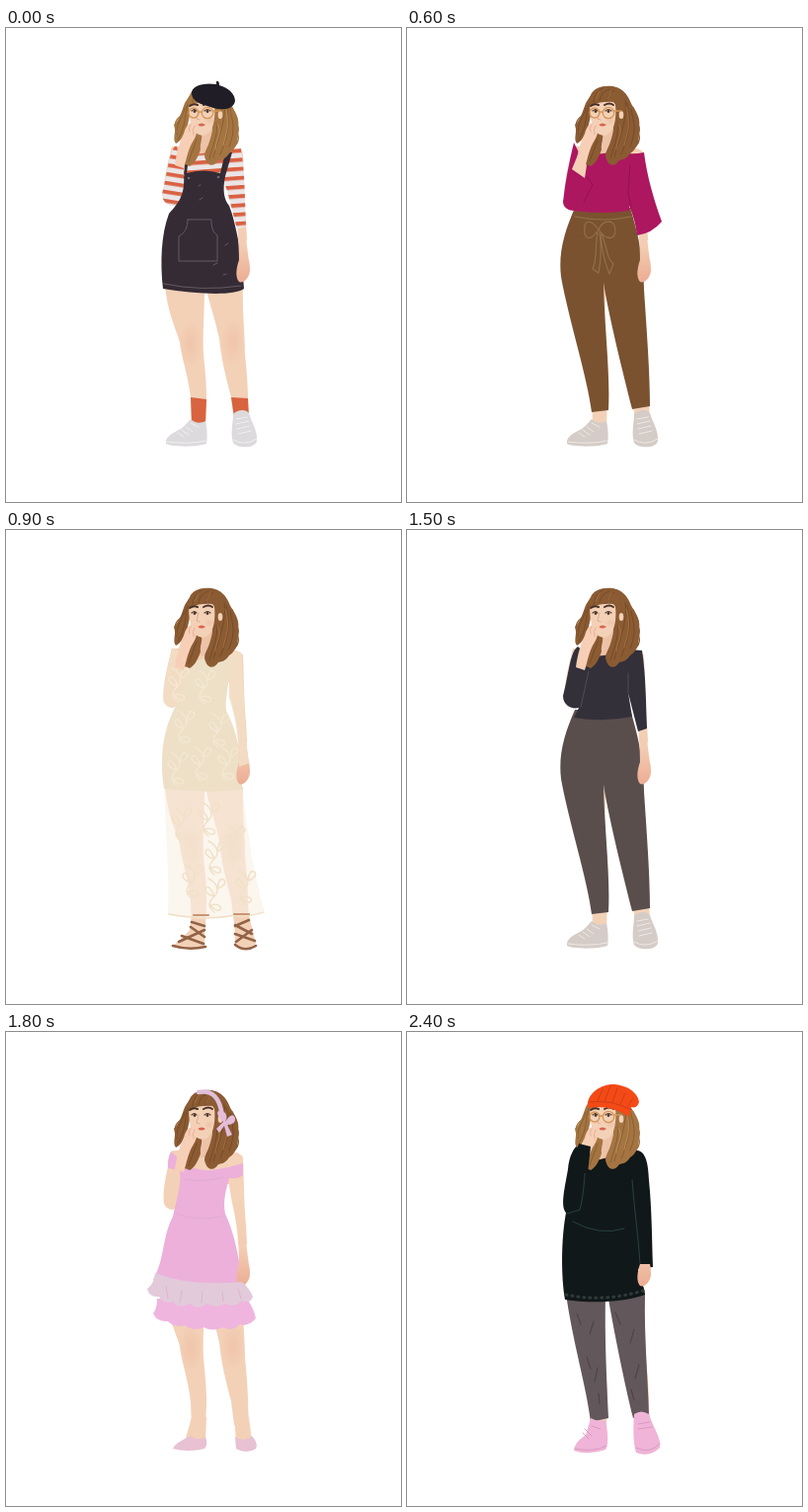
These frames come from a looping animation (400 by 480 pixels, 2.7 s). An HTML page:

```html
<!DOCTYPE html>
<html lang="en">
<head>
<meta charset="utf-8">
<title>Nine outfits</title>
<style>
html, body { margin: 0; width: 100%; height: 100%; overflow: hidden; background: #fff; }
svg { display: block; width: 100%; height: 100%; }
.look {
  visibility: hidden;
  animation: show 2700ms step-end infinite;
  animation-delay: calc(var(--i) * 300ms - 2700ms);
}
@keyframes show {
  0% { visibility: visible; }
  11.111111%, 100% { visibility: hidden; }
}
.light { --hair: #a47542; --dark: #805528; --shine: #c29a62; }
.brown { --hair: #8b5b33; --dark: #6d4423; --shine: #a97a4b; }
.hair { fill: var(--hair); }
.line { fill: none; stroke-linecap: round; stroke-linejoin: round; }
.skin { fill: #f3d1b7; }
</style>
</head>
<body>
<svg viewBox="0 0 400 480" xmlns="http://www.w3.org/2000/svg">
<defs>
  <radialGradient id="blush">
    <stop offset="0" stop-color="#e9a98e" stop-opacity=".32"/>
    <stop offset="1" stop-color="#e9a98e" stop-opacity="0"/>
  </radialGradient>
  <linearGradient id="armTone" gradientUnits="userSpaceOnUse" x1="0" y1="165" x2="0" y2="256">
    <stop offset="0" stop-color="#f4d3b8"/>
    <stop offset=".6" stop-color="#f3cdb3"/>
    <stop offset="1" stop-color="#ecae95"/>
  </linearGradient>
  <linearGradient id="denim" x1="0" y1="0" x2="0" y2="1">
    <stop offset="0" stop-color="#abd0df"/>
    <stop offset="1" stop-color="#9bc4d5"/>
  </linearGradient>
  <pattern id="stripeL" width="40" height="9" y="2" patternUnits="userSpaceOnUse" patternTransform="rotate(9 165 125)">
    <rect width="40" height="9" fill="#ebe5e6"/><rect width="40" height="3.8" fill="#da6143"/>
  </pattern>
  <pattern id="stripeR" width="40" height="9.2" y="3" patternUnits="userSpaceOnUse" patternTransform="rotate(-4 232 125)">
    <rect width="40" height="9.2" fill="#ebe5e6"/><rect width="40" height="4" fill="#da6143"/>
  </pattern>

  <g id="legs">
    <path class="skin" d="M161 260H201C201 290 199 310 200 330C202 350 203 362 203 376L202 402H188L187 374C184 350 178 335 176 318C170 300 163 285 161 260Z"/>
    <path class="skin" d="M202 260H240C239 285 242 310 242 330C244 350 245 365 245 376L246 398H231L228 374C223 355 218 335 216 315C212 295 206 280 202 260Z"/>
    <ellipse cx="187" cy="320" rx="13" ry="25" fill="url(#blush)"/>
    <ellipse cx="230" cy="318" rx="13" ry="25" fill="url(#blush)"/>
  </g>

  <g id="body">
    <path class="skin" d="M192 116H206C218 121 236 119 240 127L237 154H178L167 122C173 118 184 120 192 116Z"/>
    <path fill="url(#armTone)" d="M226 124L240 127C241 150 241 175 243 195L244 215H235C235 200 231 182 228 168C225 150 224 138 226 124Z"/>
    <path class="skin" d="M168 120C163 140 158 160 160 174C164 182 172 181 175 176C179 161 181 147 186 134L180 122Z"/>
  </g>
  <path id="palm" fill="url(#armTone)" d="M236 235H246C247 239 247 243 247 246C246 254 240 259 236 257C232 253 233 243 236 235Z"/>
  <g id="forearm">
    <path fill="url(#armTone)" d="M235 203H243C243 217 245 227 246 236L236 237C236 225 235 214 235 203Z"/>
    <use href="#palm"/>
  </g>

  <g id="head">
    <path fill="#edc3a8" d="M192 100L209 97L207 126L191 128Z"/>
    <path class="hair" d="M187 100L198 107C199 113 196 118 197 123C194 132 191 137 186 140Q183 138 179 138C184 125 188 113 187 100Z"/>
    <path class="hair" d="M186 68C190 57 211 56 219 64C226 70 226 77 230 81C231 86 236 91 235 98C238 104 233 110 235 116C232 120 230 125 226 127C222 133 219 133 215 134C211 141 204 140 202 133C199 127 204 122 206 115C209 107 209 101 209 96C212 85 209 78 207 75H188C187 82 186 90 184 98C182 106 178 114 172 117C168 112 173 105 170 98C176 92 178 84 181 76Z"/>
    <path class="skin" d="M186 73L210 71C213 85 211 99 207 104C203 110 197 111 190 104C186 94 184 84 186 73Z"/>
    <ellipse class="skin" cx="217" cy="88" rx="2.3" ry="4"/>
    <ellipse cx="206" cy="94" rx="6" ry="5" fill="url(#blush)"/>
    <path class="hair" d="M182 80C184 67 194 58 206 59C216 60 220 68 215 82L209 75C202 74 194 75 187 78Z"/>
    <g class="line" stroke="var(--dark)" stroke-width=".7">
      <path d="M184 77C180 87 184 96 174 113M181 81C179 91 172 96 173 108M189 75C190 68 193 64 198 61M195 74C196 68 199 64 205 62M202 74C204 69 205 66 210 63M213 96C215 106 211 115 206 132M221 73C224 90 216 108 210 131M223 76C225 88 229 99 217 128M227 82C228 92 234 101 226 120M193 113L185 135"/>
      <path d="M229 81Q238 94 233 104Q239 113 230 121M177 89Q168 95 173 106" stroke="var(--hair)" stroke-width="1.2"/>
      <path d="M214 97C220 106 213 110 212 123M222 80C228 99 222 108 220 119M191 72L195 64M203 72L207 64" stroke="var(--shine)"/>
    </g>
    <g class="line" stroke="#493025">
      <path d="M186 79Q190 76 194 78M200 78Q205 75 209 78" stroke-width="2"/>
      <path d="M188 84Q191 81 193 84M201 84Q204 81 207 84" stroke-width="1.1"/>
      <path d="M195 84L193 92L196 93" stroke="#dba085" stroke-width=".8"/>
    </g>
    <circle cx="191" cy="84.5" r="1.4" fill="#48362e"/><circle cx="204" cy="84.5" r="1.4" fill="#48362e"/>
    <path d="M194 98Q198 95 202 98Q198 101 194 98Z" fill="#d9654f"/>
  </g>
  <g id="glasses" class="line" stroke="#d59658" stroke-width="1.3">
    <circle cx="190" cy="86" r="5"/><circle cx="204" cy="86" r="5.7"/>
    <path d="M195 85H198M210 84L217 84"/>
  </g>
  <g id="hand">
    <path fill="#f6cfb6" d="M171 139C173 124 177 113 180 107C182 99 186 95 191 95C195 95 196 99 193 102C194 107 191 112 188 117C184 125 183 132 180 142Z"/>
    <path class="line" d="M187 98Q184 101 186 105M191 99Q188 103 190 108" stroke="#e5a68e" stroke-width=".8"/>
  </g>

  <g id="stripedShirt">
    <path fill="url(#stripeL)" d="M173 118C165 123 164 146 158 168C158 177 166 182 176 180L184 143L175 133Z"/>
    <path fill="url(#stripeR)" d="M180 125C190 121 205 121 226 122L238 122C242 146 242 178 243 201L234 204L224 165L218 150H180Z"/>
  </g>
  <path id="jeans" fill="url(#denim)" d="M156 246L240 244C239 290 244 340 245 388L226 390C216 350 205 300 199 262C202 310 207 350 207 393L188 391C183 340 165 300 156 246Z"/>
  <g id="sneakers">
    <path fill="var(--shoe)" d="M187 396C192 401 198 400 202 398C204 407 204 416 203 421C195 424 171 425 162 421C161 415 167 411 173 408C180 405 183 400 187 396Z"/>
    <path fill="var(--shoe)" d="M230 391C235 386 243 386 246 390C249 400 255 408 254 418C253 426 234 426 230 420C227 410 230 400 230 391Z"/>
    <g class="line" stroke="var(--lace)" stroke-width="1">
      <path d="M163 419Q184 422 203 418M230 417Q241 424 254 416M182 404L189 409M178 407L185 412M174 410L180 414M187 400L195 404M233 396L244 394M233 401L246 398M234 406L247 403M235 411L248 408"/>
    </g>
  </g>
  <path id="pants" d="M170 182H226C232 202 240 230 240 265C243 310 246 350 246 383L228 386C219 350 205 295 199 258C200 305 206 350 204 387L187 389C183 355 164 296 156 252C153 227 160 205 170 182Z"/>
  <g id="sweater">
    <path d="M174 113L186 116C183 122 183 128 184 134C195 126 215 127 225 120C240 117 244 126 245 150C248 180 248 210 249 238L234 240C234 249 241 257 241 266C220 274 185 275 160 271C156 247 156 210 161 183C155 176 160 157 163 139C164 126 169 117 174 113Z"/>
    <g class="line" stroke="#244341" stroke-width="1">
      <path d="M181 128C180 147 179 165 175 180L162 184M228 150C230 178 234 205 236 234M168 192Q195 207 220 199"/>
    </g>
  </g>
  <path id="vine" class="line" d="M0 0C10 5 11 13 6 18S-2 28 6 34M9 10C16 8 19 3 15 1S10 5 9 10M6 18C-1 17-5 11-2 9S4 13 6 18M2 27C9 25 14 28 12 31S5 31 2 27"/>
</defs>

<!-- Pinafore and beret -->
<g class="look light" style="--i:0;--shoe:#dcdadd;--lace:#f1eff2">
  <use href="#legs"/>
  <path fill="#d8633f" d="M187 374L203 376L202 400H188ZM228 374L245 375L246 394H231Z"/>
  <use href="#sneakers"/><use href="#body"/><use href="#stripedShirt"/>
  <path fill="#352b35" d="M183 147Q200 142 217 147L222 126H229L222 150C219 165 221 174 226 180C234 200 240 240 241 264C230 272 190 269 159 264C156 238 157 209 165 188C172 180 178 174 180 160L181 132H185Z"/>
  <path class="line" d="M184 194H208C208 205 211 208 214 210V236H175V211C181 208 184 202 184 194ZM160 259Q198 267 238 261" stroke="#665963" stroke-width="1"/>
  <path class="line" d="M196 174L199 172M222 220L225 218M210 240L214 238M220 250L223 249M195 160L197 159" stroke="#665963" stroke-width="1"/>
  <circle cx="185" cy="152" r="1.3" fill="#716677"/><circle cx="215" cy="151" r="1.3" fill="#716677"/>
  <use href="#forearm"/>
  <use href="#head"/><use href="#glasses"/><use href="#hand"/>
  <path fill="#211d26" d="M188 67C187 59 199 55 213 57L213 54Q216 53 216 58C226 61 232 67 232 74C230 83 219 84 207 80C196 77 189 74 188 67Z"/>
</g>

<!-- Shirt and jeans -->
<g class="look brown" style="--i:1;--shoe:#d8d0cc;--lace:#f0e9e5">
  <use href="#legs"/><use href="#sneakers"/><use href="#body"/>
  <use href="#pants" fill="url(#denim)"/><use href="#forearm"/>
  <path fill="#dedde3" d="M173 118C165 123 164 146 158 168C158 177 166 182 174 180L169 190Q200 195 228 189L224 165L234 204L243 201C242 178 242 146 238 122L226 121L180 124Z"/>
  <path class="line" d="M184 143L176 179M224 145V165" stroke="#c2c1ca"/>
  <use href="#head"/><use href="#glasses"/><use href="#hand"/>
</g>

<!-- Berry blouse -->
<g class="look brown" style="--i:2;--shoe:#d5ccc7;--lace:#eee8e4">
  <use href="#legs"/><use href="#sneakers"/><use href="#body"/>
  <use href="#pants" fill="#7a5230"/>
  <g class="line" stroke="#93704c" stroke-width="1.1">
    <path d="M170 191Q198 197 227 191M193 203C185 192 178 195 180 208C183 218 190 210 194 204C199 193 210 194 211 204C211 215 202 216 194 204M193 207C190 224 193 233 188 244L194 248C197 232 197 220 195 207M197 208C203 223 202 233 209 239L205 249C199 235 197 222 196 209"/>
  </g>
  <use href="#forearm"/>
  <path fill="#ad1760" d="M169 116C164 137 160 157 158 176C158 182 164 185 169 185Q198 189 225 185L225 180Q231 194 233 210Q248 208 258 196C250 174 243 150 240 126Q226 129 211 125L190 125L186 139L176 130Z"/>
  <path class="line" d="M182 150L188 159L179 176M226 139L224 166L227 183" stroke="#93104f" stroke-width="1"/>
  <path class="skin" d="M174 126L183 132L180 152L167 143Z"/>
  <use href="#head"/><use href="#glasses"/><use href="#hand"/>
</g>

<!-- Lace gown -->
<g class="look brown" style="--i:3">
  <use href="#legs"/>
  <path class="skin" d="M188 390H202L201 421Q184 426 169 421Q180 412 186 405ZM231 390H246L253 419Q242 427 232 420Z"/>
  <g class="line" stroke="#936346" stroke-width="2.6">
    <path d="M169 421Q185 426 202 422M178 411L200 419M175 417L201 405M187 402L201 412M188 397L201 401M232 420Q242 428 253 421M232 409L252 416M233 417L249 405M232 400L249 409M232 401L246 395"/>
  </g>
  <use href="#body"/>
  <path fill="#f8f0e3" fill-opacity=".6" d="M160 255L239 256C244 305 251 350 262 388Q247 393 231 391Q205 397 164 390C166 350 161 300 160 255Z"/>
  <path fill="#ede0c7" d="M178 137C188 130 205 132 227 125C229 148 221 167 223 183C235 205 240 235 239 263Q200 267 160 262C155 228 160 203 169 184C177 170 179 154 178 137Z"/>
  <use href="#forearm"/>
  <path fill="#f3dec6" fill-opacity=".9" d="M168 119C164 139 157 163 160 175Q168 183 175 177L186 137L177 123ZM226 121L238 124C242 160 241 205 246 236L236 240C237 210 231 185 226 170Z"/>
  <g stroke="#f3e8d4" stroke-width="1.3">
    <use href="#vine" x="195" y="142"/><use href="#vine" x="174" y="183"/>
    <use href="#vine" x="209" y="186"/><use href="#vine" x="191" y="220"/>
    <use href="#vine" x="218" y="220"/><use href="#vine" x="167" y="225"/>
    <use href="#vine" x="168" y="140"/>
  </g>
  <g stroke="#f0e1c8" stroke-width="1.5">
    <use href="#vine" x="199" y="276"/><use href="#vine" x="171" y="281"/>
    <use href="#vine" x="205" y="315"/><use href="#vine" x="182" y="339"/>
    <use href="#vine" x="225" y="300"/><use href="#vine" x="236" y="345"/>
    <use href="#vine" x="205" y="353"/>
  </g>
  <path class="line" d="M165 389Q205 396 231 390Q247 392 261 387" stroke="#efdfc6" stroke-width="1.3"/>
  <path class="line" d="M190 390H205M231 389H246" stroke="#c99572" stroke-width="2"/>
  <use href="#head"/><use href="#hand"/>
</g>

<!-- Cap and hooded jacket -->
<g class="look light" style="--i:4">
  <use href="#legs"/><use href="#body"/><use href="#jeans"/>
  <g fill="#e84620">
    <path d="M186 389Q195 396 204 392C206 406 205 417 203 425Q178 428 158 424Q158 417 169 412Q181 406 186 389Z"/>
    <path d="M231 390Q238 385 245 389C249 400 254 412 253 422Q242 429 233 423C228 411 231 402 231 390Z"/>
  </g>
  <g class="line" stroke="#f4eeea">
    <path d="M159 424Q181 426 203 423M233 422Q243 427 253 420" stroke-width="3.5"/>
    <path d="M180 398L187 404M177 403L185 409M171 408L180 413M185 397L180 409M234 395L243 399M243 393L234 403M233 406L246 408M246 402L235 413" stroke-width="1.3"/>
  </g>
  <path fill="#f4eeea" d="M158 424Q159 415 168 415L173 425ZM233 423Q232 415 241 414Q252 413 254 421Q243 429 233 423Z"/>
  <circle cx="197" cy="409" r="3" fill="#f4eeea"/>
  <path fill="#dcdee4" d="M180 126Q196 118 214 126L216 242Q196 246 176 238Z"/>
  <path fill="#eceef1" d="M184 183L193 178L202 184L199 194L188 195Z"/>
  <text transform="translate(185 164) rotate(-24)" fill="#e84b2b" font-family="'Noto Serif', serif" font-size="13" font-style="italic" font-weight="700">Basic</text>
  <path class="line" d="M184 163Q191 166 196 158" stroke="#e84b2b" stroke-width="1.8"/>
  <path fill="#101415" d="M173 114L187 118C184 127 184 135 187 142L182 161C181 191 178 219 180 246L155 249C156 223 158 201 161 181C154 174 160 154 162 136C163 125 167 118 173 114Z"/>
  <path fill="#101415" d="M213 130C222 123 229 118 233 109C242 111 244 119 243 127C246 159 247 200 248 234L236 236L238 249H214C211 213 216 170 213 130Z"/>
  <path class="line" d="M185 142C181 160 179 175 164 179M231 145C232 180 234 210 236 235M233 111Q239 118 239 125M166 204L163 231" stroke="#2a3737" stroke-width="1"/>
  <use href="#palm"/>
  <use href="#head"/><use href="#glasses"/><use href="#hand"/>
  <path fill="#101415" d="M173 114L187 118L184 143L164 143Z"/>
  <path fill="#e94119" d="M186 69C186 58 197 51 207 53C219 55 225 66 224 81C212 74 197 72 186 74C179 78 172 79 170 76C172 71 180 69 186 69Z"/>
  <path class="line" d="M186 70Q203 67 222 76M207 54Q199 59 199 69M208 54Q216 61 217 73" stroke="#bb3218" stroke-width="1"/>
</g>

<!-- Dark top and trousers -->
<g class="look brown" style="--i:5;--shoe:#d5ccc7;--lace:#eee8e4">
  <use href="#legs"/><use href="#sneakers"/><use href="#body"/>
  <use href="#pants" fill="#594e4c"/><use href="#forearm"/>
  <path fill="#343039" d="M173 118C165 123 164 146 158 168C158 177 166 182 174 180L169 190Q200 195 228 189L224 165L234 204L243 201C242 178 242 146 238 122L226 121L180 124Z"/>
  <path class="line" d="M184 143L176 179M224 145V165" stroke="#514b56"/>
  <use href="#head"/><use href="#hand"/>
</g>

<!-- Pink frilled dress -->
<g class="look brown" style="--i:6">
  <use href="#legs"/>
  <path class="skin" d="M188 390H203L202 414L181 415ZM231 390H246L249 414H233Z"/>
  <path fill="#e8c1d2" d="M187 409Q193 415 202 410Q205 418 201 422Q184 426 169 422Q171 416 187 409ZM232 410Q241 416 249 409Q256 417 253 422Q243 428 233 422Z"/>
  <use href="#body"/>
  <path fill="#ecb0da" d="M167 121Q163 129 164 138L176 140C178 157 171 175 169 187C158 207 161 230 149 251Q198 267 240 254C235 227 232 205 222 184C219 170 224 156 226 148Q235 149 240 145V133Q227 137 214 139Q195 143 179 132Z"/>
  <use href="#forearm"/>
  <path fill="#efb5de" d="M153 270L244 270Q251 280 253 290Q245 299 237 296Q229 304 220 299Q209 304 200 299Q190 304 181 297Q171 300 164 293Q153 294 149 285Q153 280 153 270Z"/>
  <path fill="#e2cadb" d="M151 244Q186 258 239 253Q247 260 250 268Q247 276 239 272Q231 280 222 275Q213 281 204 275Q195 282 186 275Q175 281 169 273Q160 276 155 268Q145 269 143 260Q150 255 151 244Z"/>
  <path class="line" d="M180 149Q198 153 220 147M173 184Q195 193 220 186M162 258L164 270M178 262L176 274M199 263L198 274M219 263L220 273M235 260L238 270" stroke="#dfabd0" stroke-width=".8"/>
  <use href="#head"/>
  <path class="line" d="M195 61Q216 57 219 86" stroke="#dfbfda" stroke-width="4.5"/>
  <path fill="#e4bddb" d="M220 91Q210 81 217 79Q226 82 222 91Q229 80 232 87Q233 94 224 94L229 104L224 106L221 95L216 102L213 98Z"/>
  <use href="#hand"/>
</g>

<!-- Hat, coat and boots -->
<g class="look brown" style="--i:7">
  <use href="#legs"/>
  <path fill="#49382f" d="M183 362L204 363L205 425Q184 433 163 427Q162 419 181 411ZM226 361L246 362L254 421Q246 434 231 428L232 402Z"/>
  <use href="#body"/><use href="#sweater" fill="#584444"/><use href="#palm"/>
  <use href="#head"/><use href="#hand"/>
  <path fill="#463530" d="M174 77Q181 71 187 69Q190 49 204 48Q219 49 222 69Q233 72 237 80Q214 74 174 77Z"/>
  <path class="line" d="M188 69Q205 66 221 70" stroke="#765c4d" stroke-width="2"/>
</g>

<!-- Beanie and sweater dress -->
<g class="look light" style="--i:8">
  <use href="#legs"/>
  <path fill="#62575a" d="M161 265H201C200 303 202 350 204 391L186 395C182 360 168 315 161 265ZM203 265H241C240 310 244 350 245 389L229 391C220 355 210 305 203 265Z"/>
  <path class="line" d="M172 285L176 296M189 293L185 306M193 340L190 354M182 329L186 341M211 284L216 296M230 301L226 315M235 337L231 351M227 362L230 373M194 366L195 376" stroke="#4d4347" stroke-width="1.1"/>
  <path fill="#efb4d7" d="M186 391Q193 395 201 393C204 408 204 418 201 423Q184 429 169 424Q169 416 181 408ZM230 387Q237 382 245 387C250 402 258 412 256 421Q246 431 232 426Q228 413 230 387Z"/>
  <path class="line" d="M180 402L187 409M178 406L184 412M187 399L196 402M170 422Q189 426 202 419M234 397L246 395M234 402L248 400M232 421Q245 428 256 417" stroke="#d998c0" stroke-width=".9"/>
  <use href="#body"/><use href="#sweater" fill="#111819"/>
  <path class="line" d="M161 266Q199 274 239 262" stroke="#2f3a38" stroke-width="3" stroke-dasharray="1 5"/>
  <use href="#palm"/>
  <use href="#head"/><use href="#glasses"/><use href="#hand"/>
  <path fill="#111819" d="M174 113L186 116L183 143L164 143Z"/>
  <path fill="#f34a17" d="M183 77C181 64 194 54 207 53C222 53 234 61 235 71Q233 78 227 76L225 86Q205 73 183 77Z"/>
  <path class="line" d="M185 71Q208 68 227 79M193 70L198 58M200 70L206 55M208 71L213 57M216 73L221 62M224 75L229 67" stroke="#cd3b16" stroke-width=".9"/>
</g>
</svg>
</body>
</html>
```
